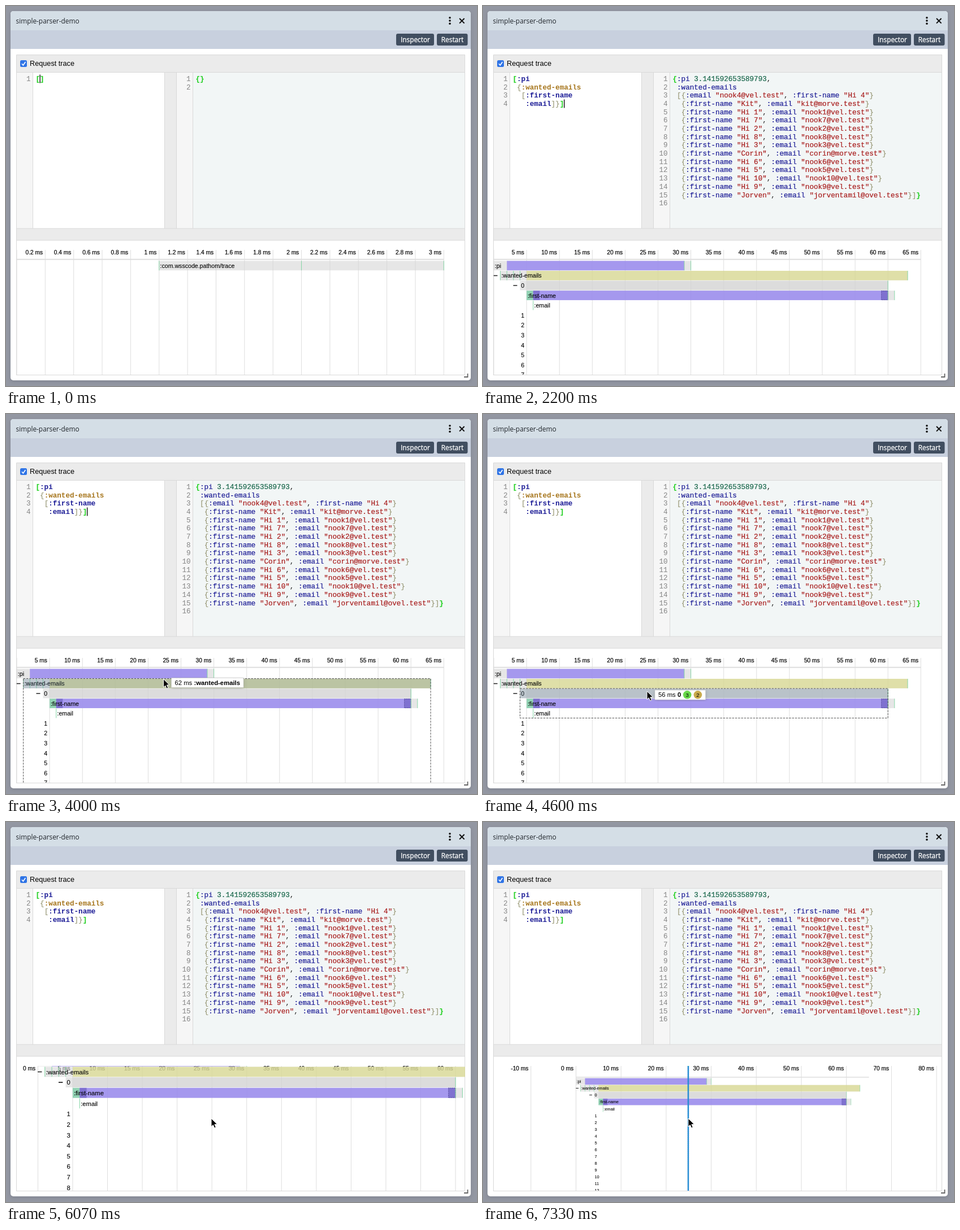
Recreate the animation shown at these times as an HTML page. Size 833 by 673 pixels, loop 7.47 s.

```html
<!DOCTYPE html>
<html lang="en">
<head>
<meta charset="utf-8">
<title>simple-parser-demo</title>
<style>
  html, body { margin: 0; width: 100%; height: 100%; overflow: hidden; background: #9397a2; }
  svg { display: block; width: 833px; height: 673px; }
  text { white-space: pre; }
  .ui { font-family: "Open Sans", sans-serif; }
  .sans { font-family: "Liberation Sans", Arial, sans-serif; }
  .code { font: 12.6px "Liberation Mono", "Courier New", monospace; stroke-width: .2; }
  .code .kw { fill: #1c1c96; stroke: #1c1c96; }
  .code .str { fill: #a81c1c; stroke: #a81c1c; }
  .code .num { fill: #17664a; stroke: #17664a; }
  .code .br { fill: #999977; stroke: #999977; }
  .code .hit { fill: #2bd22b; stroke: #2bd22b; font-weight: bold; }
  .code .gold { fill: #a5741a; stroke: #a5741a; }
  .query .kw, .query .gold { font-weight: bold; stroke: none; }
  .ln { font: 12.6px "Liberation Mono", "Courier New", monospace; fill: #858585; text-anchor: end; }
  .tick { font-size: 10.2px; fill: #000; stroke: #000; stroke-width: .2; text-anchor: end; }
  .row { font-size: 10.6px; fill: #000; stroke: #000; stroke-width: .1; }
  .grid { stroke: #dedede; }
  .mark { stroke: #86d6a6; stroke-width: 1; }
</style>
</head>
<body>
<svg id="stage" viewBox="0 0 833 673">
  <defs>
    <clipPath id="clip"><rect x="18.5" y="432" width="793.5" height="221"/></clipPath>
    <filter id="soft" x="-10%" y="-10%" width="120%" height="120%"><feGaussianBlur stdDeviation="3"/></filter>
  </defs>
  <rect width="833" height="673" fill="#9397a2"/>
  <rect x="8" y="11" width="814" height="654" rx="4" fill="#666b78" opacity=".45" filter="url(#soft)"/>
  <rect x="8" y="9" width="814" height="654" rx="5" fill="#fff"/>
  <path d="M8 43V14a5 5 0 0 1 5-5H817a5 5 0 0 1 5 5V43Z" fill="#d4dee6"/>
  <rect x="8" y="43" width="814" height="33" fill="#c8d0de"/>
  <text class="ui" x="17.5" y="30.5" font-size="11.85" fill="#20252b">simple-parser-demo</text>
  <g fill="#111"><circle cx="785" cy="20.8" r="1.8"/><circle cx="785" cy="26" r="1.8"/><circle cx="785" cy="31.2" r="1.8"/></g>
  <path d="M802 22l8.6 8.6m0-8.6l-8.6 8.6" stroke="#111" stroke-width="2"/>
  <g id="buttons"></g>
  <g id="panes"></g>
  <g clip-path="url(#clip)">
    <g id="axis"></g>
    <g id="before"></g>
    <g id="after"></g>
    <g id="hover"></g>
    <g id="ruler">
      <path d="M363 432V653" stroke="#2a78e4" stroke-width="2.4"/>
      <path d="M363 432V653" stroke="#25aabb" stroke-width="2.4" stroke-dasharray="1.5 2"/>
    </g>
  </g>
  <g id="tip"></g>
  <path d="M810 657H816.5V651" fill="none" stroke="#666" stroke-width="1.8"/>
  <path id="mouse" d="M0 0V14.6L3.3 11.5 5.6 16.8 8.2 15.7 5.9 10.5 10.5 10.3Z" fill="#000" stroke="#fff" stroke-width="1"/>
</svg>
<script>
const LOOP = 7470, FPS = 15;
const LEFT = 19, SPAN = 755.3, RIGHT = 812;
const PIVOT = [363, 525];
const ROW = 17.58;
const $ = id => document.getElementById(id);

function add(parent, tag, attrs = {}, text) {
  const node = document.createElementNS("http://www.w3.org/2000/svg", tag);
  for (const name in attrs) node.setAttribute(name, attrs[name]);
  if (text !== undefined) node.textContent = text;
  parent.appendChild(node);
  return node;
}
const rect = (p, x, y, width, height, fill, more) => add(p, "rect", { x, y, width, height, fill, ...more });
const line = (p, d, cls, more) => add(p, "path", { d, class: cls, fill: "none", ...more });
const show = (node, on) => node.setAttribute("visibility", on ? "visible" : "hidden");

// Linear track through [step, ...values] keys
function track(keys, n) {
  if (n <= keys[0][0]) return keys[0].slice(1);
  for (let i = 1; i < keys.length; i++) {
    const a = keys[i - 1], b = keys[i];
    if (n <= b[0]) {
      const f = (n - a[0]) / (b[0] - a[0]);
      return a.slice(1).map((v, j) => v + (b[j + 1] - v) * f);
    }
  }
  return keys[keys.length - 1].slice(1);
}

// ---- static interface ----
function button(x, y, w, h, tx, ty, size, label) {
  rect($("buttons"), x, y, w, h, "#414e60", { rx: 3 });
  add($("buttons"), "text", { class: "ui", x: tx, y: ty, "font-size": size, fill: "#fff", stroke: "#fff", "stroke-width": .3 }, label);
}
const panes = $("panes");
rect(panes, 18, 87, 794, 30, "#ebebeb");
rect(panes, 18, 117, 29.5, 277, "#f6f6f6");
rect(panes, 281, 117, 20, 277, "#ebebeb");
rect(panes, 301, 117, 29.5, 277, "#f6f6f6");
rect(panes, 330.5, 117, 481.5, 277, "#f2f6f6");
rect(panes, 18, 394, 794, 21, "#ebebeb");
line(panes, "M18.5 653.5V86.5H812M18 117.5H812M47.5 117V394M280.5 117V394M301.5 117V394M330.5 117V394M18 394H812M18 415H812M811.5 87V653.5H18", "", { stroke: "#d9d9d9" });
rect(panes, 25, 96, 12, 12, "#2f74e6", { rx: 2.5 });
line(panes, "M28 102.2l2.4 2.8 4-6", "", { stroke: "#fff", "stroke-width": 1.6 });
add(panes, "text", { class: "sans", x: 42, y: 106.3, "font-size": 12.7, fill: "#000" }, "Request trace");
button(690, 49, 67, 21, 698, 63.8, 11.85, "Inspector");
button(762, 49, 54.5, 21, 769.8, 63.8, 11.85, "Restart");
button(650, 92, 84.5, 20, 658, 105.6, 10.85, "Refresh index");
button(740, 92, 68, 20, 748, 105.6, 10.85, "Run query");

// ---- code ----
const lineY = i => 133 + i * 14.68;

function code(lines, x, cls, matched = true) {
  const g = add(panes, "g", { class: "code " + cls });
  lines.forEach((src, row) => {
    const text = add(g, "text", { x, y: lineY(row), fill: "#222" });
    const parts = src.match(/:[\w-]+|"[^"]*"|[\d.]+|[[\]{}]|[\s,]+/g) || [];
    parts.forEach((part, i) => {
      const edge = (row === 0 && i === 0) || (row === lines.length - 1 && i === parts.length - 1);
      let kind = "";
      if (part[0] === ":") kind = cls === "query" && part === ":wanted-emails" ? "gold" : "kw";
      else if (part[0] === '"') kind = "str";
      else if (/\d/.test(part)) kind = "num";
      else if (/[[\]{}]/.test(part)) kind = edge && matched ? "hit" : "br";
      add(text, "tspan", { class: kind }, part);
    });
  });
  return g;
}
function numbers(x, from, to) {
  const g = add(panes, "g");
  for (let i = from; i <= to; i++) add(g, "text", { class: "ln", x, y: lineY(i - 1) }, i);
  return g;
}

const people = ["Kit", 1, 7, 2, 8, 3, "Corin", 6, 5, 10, 9, "Jorven"];
const emails = { Kit: "kit@morve.test", Corin: "corin@morve.test", Jorven: "jorventamil@ovel.test" };
const entry = p => typeof p === "number"
  ? `  {:first-name "Hi ${p}", :email "nook${p}@vel.test"}`
  : `  {:first-name "${p}", :email "${emails[p]}"}`;
const result = [
  "{:pi 3.141592653589793,",
  " :wanted-emails",
  ' [{:email "nook4@vel.test", :first-name "Hi 4"}',
  ...people.map(entry)
];
result[result.length - 1] += "]}";
const query = ["[:pi", " {:wanted-emails", "  [:first-name", "   :email]}]"];

const selection = rect(panes, 52.5, 122, 15.1, 14.7, "#d7d4f0");
const emptyQuery = code(["[]"], 52.5, "query");
const pickedQuery = code(["[]"], 52.5, "query", false);
const fullQuery = code(query, 52.5, "query");
const emptyResult = code(["{}"], 335.5, "");
const fullResult = code(result, 335.5, "");
numbers(43.6, 1, 1);
numbers(326.6, 1, 2);
const moreLeft = numbers(43.6, 2, 4), moreRight = numbers(326.6, 3, 16);
const caret = rect(panes, 0, 0, 1.3, 15, "#000");

// ---- trace rows ----
const GREY = ["#d6d6d6", .6], PURPLE = ["#9585f0", .8], DARK = ["#5a4cb4", .5];
const GREEN = ["#7ecfa8", .8], YELLOW = ["#dbdb7f", .6], FAINT = ["#d4d4d4", .5];
const rows = [
  { name: ":pi", from: 0, to: 30, marks: [29, 30], events: [[2, 29, PURPLE]], depth: 1 },
  { name: ":wanted-emails", from: 1, to: 63, marks: [1, 2, 3, 4, 63], events: [[5, 63, YELLOW]], depth: 19, open: true },
  { name: "0", from: 4, to: 60, marks: [60], events: [[5, 60, FAINT]], depth: 3, open: true, counts: [[3, "#69d94a"], [2, "#c8aa4c"]] },
  { name: ":first-name", from: 5, to: 61, marks: [60, 61], events: [[5, 6, GREEN], [6, 60, PURPLE], [6, 7, DARK], [59, 60, DARK]], depth: 1 },
  { name: ":email", from: 6, to: 6, marks: [6], events: [], depth: 1 }
];
for (let i = 1; i <= 14; i++) rows.push({ name: String(i), from: 4, to: 4, marks: [], events: [], depth: 1 });
const rowTop = i => 451.4 + i * ROW;

function drawRows(g, list, max) {
  const px = ms => LEFT + ms * SPAN / max;
  line(g, `M${LEFT} 448.8H${LEFT + SPAN}`, "grid", { "stroke-width": 2 });
  list.forEach((r, i) => {
    const y = rowTop(i), bar = (a, b, [fill, opacity]) => rect(g, px(a), y, px(b) - px(a), 16.8, fill, { opacity });
    if (r.to > r.from) bar(r.from, r.to, GREY);
    r.events.forEach(e => bar(...e));
    if (r.name === ":first-name")
      rect(g, px(59), y + .5, px(60) - px(59), 15.8, "none", { stroke: "#4b4390", "stroke-dasharray": "1.5 1.5" });
    r.marks.forEach(m => line(g, `M${px(m)} ${y}v16.8`, "mark"));
    if (r.open) line(g, `M${px(r.from) - 12} ${y + 8.4}h7`, "", { stroke: "#222", "stroke-width": 1.5 });
    add(g, "text", { class: "sans row", x: px(r.from) + 1.8, y: y + 12.5 }, r.name);
  });
}
drawRows($("before"), [{ name: ":com.wsscode.pathom/trace", from: 1, to: 3, marks: [1, 2, 3], events: [] }], 3);
drawRows($("after"), rows, 65);

function tickStep(range) {
  const raw = range / 10, unit = 10 ** Math.floor(Math.log10(raw)), e = raw / unit;
  return unit * (e >= Math.sqrt(50) ? 10 : e >= Math.sqrt(10) ? 5 : e >= Math.SQRT2 ? 2 : 1);
}
function drawAxis(max, k, pan) {
  const g = $("axis"), unit = SPAN / max * k;
  const zero = PIVOT[0] + k * (LEFT + pan - PIVOT[0]);
  const step = tickStep((RIGHT - LEFT) / unit);
  g.textContent = "";
  for (let i = Math.ceil((LEFT - zero) / unit / step - 1e-6); ; i++) {
    const x = zero + i * step * unit;
    if (x > RIGHT) break;
    line(g, `M${x} 432V653`, "grid");
    add(g, "text", { class: "sans tick", x: x - 4.3, y: 440 }, +(i * step).toFixed(1) + " ms");
  }
}

function drawHover(i, mx, my) {
  const g = $("hover"), tip = $("tip");
  g.textContent = tip.textContent = "";
  if (i < 0) return;
  const r = rows[i], u = SPAN / 65, x = LEFT + r.from * u, w = (r.to - r.from) * u, y = rowTop(i);
  rect(g, x, y, w, 16.8, "#5f7f98", { opacity: .28 });
  rect(g, x, y - .4, w, r.depth * ROW - .4, "none", { stroke: "#555", "stroke-dasharray": "3.5 1.8" });

  const tx = mx + 14, ty = my - 2;
  const shade = rect(tip, tx, ty + 1, 0, 17, "#555", { opacity: .35, filter: "url(#soft)" });
  const box = rect(tip, tx, ty, 0, 17, "#fff", { stroke: "#ccc", "stroke-width": .6 });
  const label = add(tip, "text", { class: "sans", x: tx + 6, y: ty + 12.3, "font-size": 11.3 }, `${r.to - r.from} ms `);
  add(label, "tspan", { "font-weight": "bold" }, r.name);
  let end = tx + 6 + label.getComputedTextLength();
  for (const [count, fill] of r.counts || []) {
    add(tip, "circle", { cx: end + 11, cy: ty + 8.3, r: 7.3, fill });
    add(tip, "text", { class: "sans", x: end + 11, y: ty + 11.8, "font-size": 9.8, "text-anchor": "middle" }, count);
    end += 18.7;
  }
  for (const part of [shade, box]) part.setAttribute("width", end + 6 - tx);
}

// ---- timeline, in steps of 1/15 s ----
const mousePath = [[39, 234, 332], [46, 254, 390.5], [50, 264, 434], [52, 267, 452], [58, 276, 465], [62, 281, 474],
  [66, 287, 485], [69, 290, 491], [71, 293, 500], [74, 303, 532], [77, 312, 555], [81, 345, 546], [86, 363, 525]];
const panPath = [[77, 0, 0], [81, 33, -9], [86, 54.6, -30.3]];
const zoomPath = [[88, 1], [91, 1.0593], [92, 1.07], [94, 1.07], [98, .686]];
const caretOn = [[0, 2], [10, 11], [17, 25], [28, 36], [44, 52], [60, 68], [76, 77]];

function render(n) {
  const picked = n >= 11 && n < 17, typed = n >= 17, done = n >= 31;
  show(emptyQuery, n < 11);
  show(pickedQuery, picked);
  show(selection, picked);
  show(fullQuery, typed);
  show(moreLeft, typed);
  show(emptyResult, !done);
  show(fullResult, done);
  show(moreRight, done);
  show($("before"), !done);
  show($("after"), done);

  show(caret, caretOn.some(([a, b]) => n >= a && n < b));
  caret.setAttribute("x", typed ? 143 : 59.5);
  caret.setAttribute("y", typed ? 165.5 : 121.5);

  const [px, py] = track(panPath, n), [k] = track(zoomPath, n);
  drawAxis(done ? 65 : 3, k, px);
  $("after").setAttribute("transform",
    `translate(${PIVOT}) scale(${k}) translate(${px - PIVOT[0]} ${py - PIVOT[1]})`);

  const [mx, my] = track(mousePath, n);
  show($("mouse"), n >= 39);
  $("mouse").setAttribute("transform", `translate(${mx} ${my})`);
  const over = Math.floor((my - rowTop(0)) / ROW);
  drawHover(n >= 51 && n < 77 && over >= 0 && over < 4 ? over : -1, mx, my);
  show($("ruler"), n >= 110);
}

const start = performance.now();
let last = -1;
function tick() {
  const t = (performance.now() - start) % LOOP;
  const n = Math.floor((t + 4) * FPS / 1000);
  if (n !== last) render(last = n);
  requestAnimationFrame(tick);
}
tick();
</script>
</body>
</html>
```
